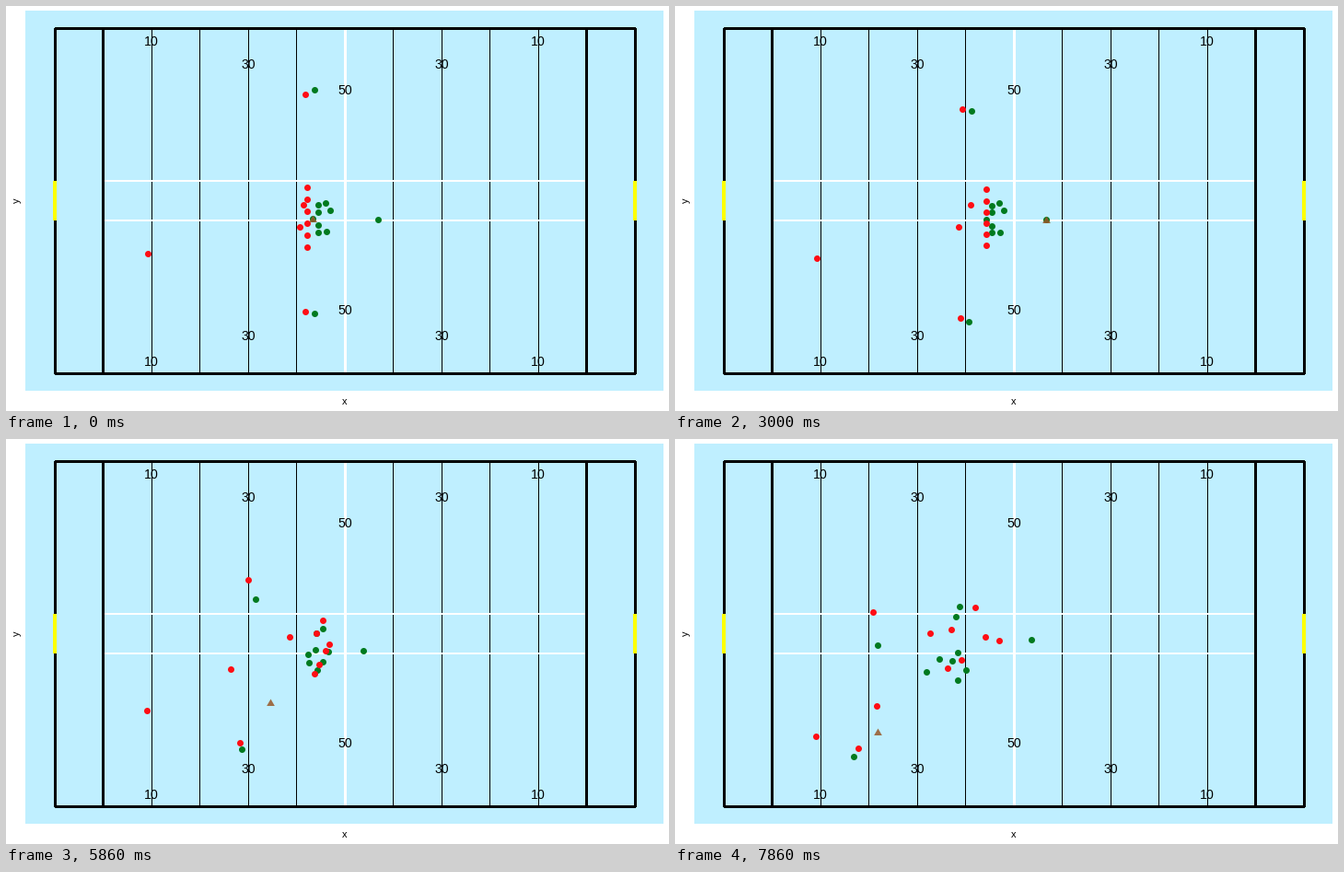
These frames come from a looping animation (720 by 440 pixels, 8 s). A matplotlib script:

```python
import numpy as np
import matplotlib.pyplot as plt
from matplotlib.animation import FuncAnimation
from matplotlib.patches import Rectangle

W, H, DPI = 720, 440, 80
LOOP_MS, INTERVAL, TICKS = 8000, 40, 56
PX = 72 / DPI
SNAP, CATCH, KICK, END = 10, 21, 29.5, 55
RED, GREEN, BROWN = "#ff0d14", "#007a1f", "#985728"
FONT = "Liberation Sans"

fig = plt.figure(figsize=(W / DPI, H / DPI), dpi=DPI, facecolor="white")
ax = fig.add_axes([0, 0, 1, 1])
ax.set(xlim=(0, W), ylim=(H, 0))
ax.axis("off")


def line(x, y, color="black", width=1.0, z=1):
    ax.plot(x, y, color=color, lw=width * PX, zorder=z,
            solid_capstyle="butt", antialiased=False)


def label(x, y, text, size, **kw):
    ax.text(x, y, text, fontsize=size * PX, family=FONT, ha="center", zorder=4, **kw)


def draw_field():
    ax.add_patch(Rectangle((21, 5), 693, 413, color="#bfefff", lw=0, zorder=0))
    top, bottom, left, right, middle, yard = 24, 399, 53, 683, 368, 5.25
    for tens in range(-4, 5):
        x = int(middle + 10 * yard * tens)
        line([x, x], [top, bottom], *(("black", 1) if tens else ("white", 3)))
    for y in (190, 233):
        line([105, 630], [y, y], "white", 2, 2)
    for x in (left, 105, 630, right):
        line([x, x], [top, bottom], width=3, z=3)
    for y in (top, bottom):
        line([left, right], [y, y], width=3, z=3)
    for x in (left, right):
        line([x, x], [190, 233], "yellow", 4, 3)
    for number, upper, lower in ((10, 38, 386), (30, 63, 358), (50, 91, 330)):
        for x in {middle - (50 - number) * yard, middle + (50 - number) * yard}:
            for y in (upper, lower):
                label(x, y + 5, str(number), 14.2, va="baseline")
    label(368, 433, "x", 11, va="baseline")
    label(11.5, 211, "y", 11, va="center", rotation=90)


def progress(now, begin, end):
    return min(max((now - begin) / (end - begin), 0), 1)


def smooth(u):
    return u * u * (3 - 2 * u)


teams = {GREEN: [], RED: []}


def lineman(team, start, push, end, begin=SNAP):
    """Shoves forward after the snap, then chases the kick to the end point."""
    start, push, end = (np.array(p, float) for p in (start, push, end))

    def at(now):
        shove = smooth(progress(now, begin, begin + 22))
        chase = progress(now, 30, END) ** 1.6
        return start + push * shove + (end - start - push) * chase
    teams[team].append(at)
    return at


def sprinter(team, start, end, power_y=1.0, sway=0.0, begin=9):
    """Speeds up along a bowed path, weaving by the sway."""
    start, end = np.array(start, float), np.array(end, float)

    def at(now):
        u = progress(now, begin, END)
        weave = sway * np.sin(2 * np.pi * u ** 1.3)
        return start + (end - start) * [u ** 1.6, u ** power_y] + [0, weave]
    teams[team].append(at)


def escort(now):
    u = progress(now, 12, END)
    return np.array([319 - 100 * smooth(u), 240 + 50 * u ** 4])


# Kicking team: front row around the snapper, three blockers, punter, gunners
PUSH = (10, 1)
front_ends = [(305, 193), (301, 241), (287, 239), (273, 253), (307, 262)]
for k, end in zip(range(-2, 3), front_ends):
    lineman(GREEN, (339 if k else 333, 231 + 7.3 * k), PUSH, end)
lineman(GREEN, (347, 214), PUSH, (309, 182))
lineman(GREEN, (352, 222), PUSH, (316, 251))
lineman(GREEN, (348, 245), PUSH, (307, 232))
punter = lineman(GREEN, (404, 232), (-16, 3), (387, 218), begin=18)
sprinter(GREEN, (335, 91), (220, 224), 1.3)
sprinter(GREEN, (335, 334), (194, 345), sway=6.5)

# Receiving team: evenly spaced rush that pinches inward, then the others
rush_ends = [(326, 183), (300, 207), (352, 219), (337, 215), (311, 240), (296, 249)]
for i, end in enumerate(rush_ends):
    y = 197 + 13 * i
    lineman(RED, (327, y), (23, 0.14 * (232 - y)), end)
lineman(RED, (323, 216), (-4, 0), (277, 211))
teams[RED].append(escort)
sprinter(RED, (325, 96), (215, 188), 1.3)
sprinter(RED, (325, 332), (199, 336), sway=6.5)
sprinter(RED, (154, 269), (153, 323), 2.5, begin=0)


def ball_at(now):
    if now < CATCH:
        u = progress(now, SNAP - 0.4, CATCH)
        return (1 - u) * np.array([333, 232]) + u * punter(CATCH)
    flight = 1 - (1 - progress(now, KICK, END)) ** 1.6
    held = punter(min(now, KICK)) + [0, 1]
    return held + (np.array([220, 319]) - held) * flight


def dots(color, marker, size, z, alpha=1):
    return ax.scatter([], [], s=(size * PX) ** 2, c=color, marker=marker, linewidths=0,
                      alpha=alpha, antialiased=False, zorder=z)


draw_field()
players = {GREEN: dots(GREEN, "o", 7, 5), RED: dots(RED, "o", 7, 6)}
ball = dots(BROWN, (3, 0), 10, 7, 0.85)


def update(frame):
    # Positions step at the slower rate of the tracking data
    tick = int((frame * INTERVAL + 35) * TICKS / LOOP_MS)
    for team, art in players.items():
        art.set_offsets(np.round([at(tick) for at in teams[team]]))
    ball.set_offsets(np.round([ball_at(tick)]))
    return [*players.values(), ball]


anim = FuncAnimation(fig, update, frames=LOOP_MS // INTERVAL, interval=INTERVAL,
                     repeat=True, repeat_delay=0)
plt.show()
```
